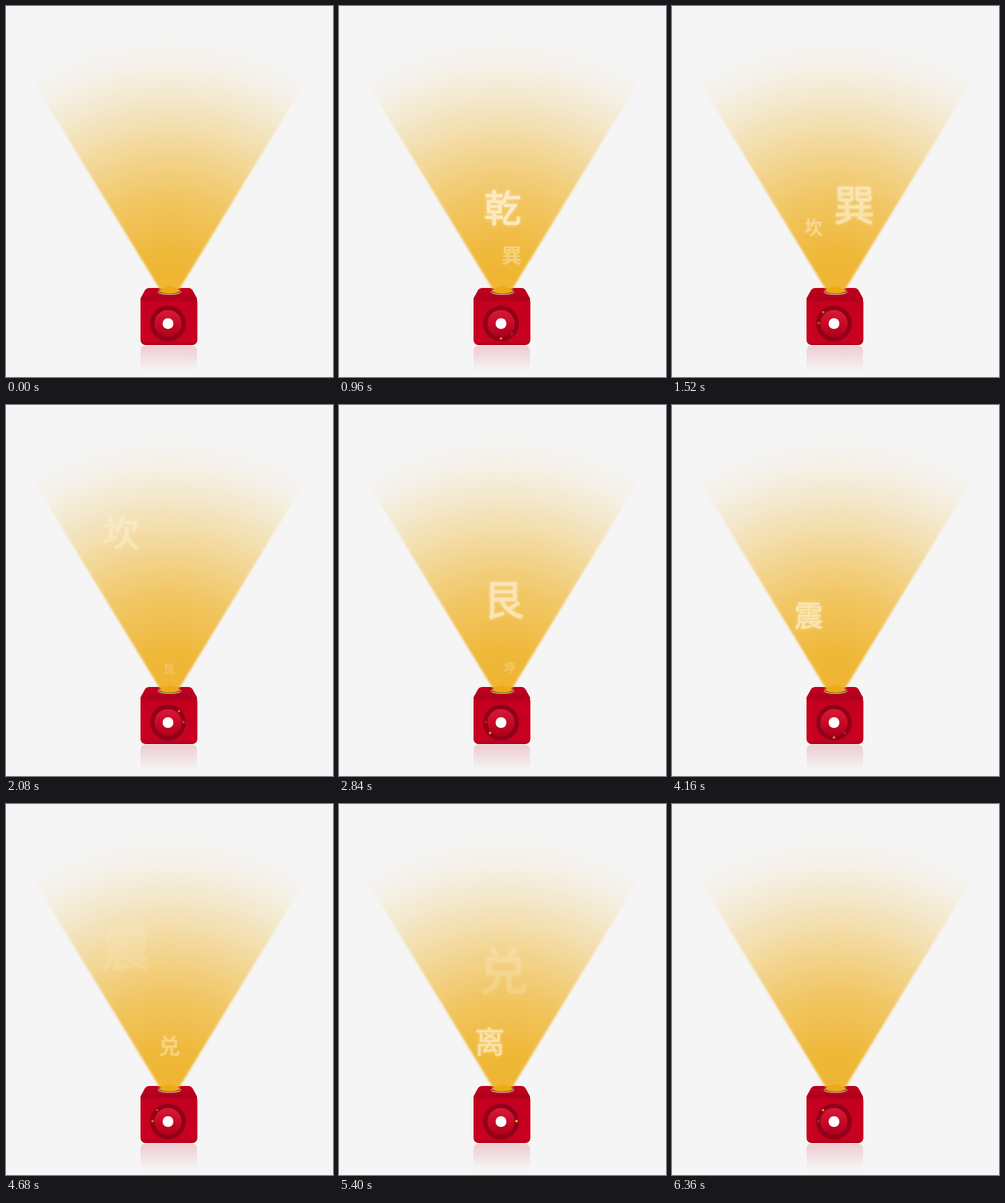
Recreate the animation shown at these times as an HTML page. Size 440 by 500 pixels, loop 6400 ms.

```html
<!DOCTYPE html>
<html lang="zh">
<head>
<meta charset="utf-8">
<style>
  html, body { margin: 0; width: 100%; height: 100%; overflow: hidden; background: #f5f5f5; }
  svg { display: block; width: 440px; height: 500px; }
  text {
    font: 400 100px "Noto Sans CJK SC", "Noto Sans CJK", sans-serif;
    text-anchor: middle;
    fill: #fff3d8; stroke: #fff3d8; stroke-width: 2;
    filter: drop-shadow(0 0 5px rgba(255, 246, 220, .6));
  }
</style>
</head>
<body>
<svg id="stage" viewBox="0 0 440 500">
  <defs>
    <radialGradient id="beam" gradientUnits="userSpaceOnUse" cx="220" cy="403" r="362">
      <stop offset="0" stop-color="#efb32a"/>
      <stop offset=".2" stop-color="#efb530" stop-opacity=".95"/>
      <stop offset=".42" stop-color="#f0b632" stop-opacity=".73"/>
      <stop offset=".61" stop-color="#f0b835" stop-opacity=".46"/>
      <stop offset=".77" stop-color="#f0ba3c" stop-opacity=".23"/>
      <stop offset=".9" stop-color="#f0bc44" stop-opacity=".07"/>
      <stop offset="1" stop-color="#f0bc44" stop-opacity="0"/>
    </radialGradient>
    <linearGradient id="lid" x2="0" y2="1">
      <stop offset="0" stop-color="#c0021f"/>
      <stop offset=".65" stop-color="#b5001c"/>
      <stop offset="1" stop-color="#a2001a"/>
    </linearGradient>
    <linearGradient id="front" x2="0" y2="1">
      <stop offset="0" stop-color="#a9001b"/>
      <stop offset=".12" stop-color="#c5001f"/>
      <stop offset=".9" stop-color="#ca0020"/>
      <stop offset="1" stop-color="#b0001b"/>
    </linearGradient>
    <linearGradient id="knob" x2="0" y2="1">
      <stop offset="0" stop-color="#d51a38"/>
      <stop offset=".5" stop-color="#c80a27"/>
      <stop offset="1" stop-color="#a9001b"/>
    </linearGradient>
    <linearGradient id="mirror" x2="0" y2="1">
      <stop offset="0" stop-color="#d0233f" stop-opacity=".2"/>
      <stop offset="1" stop-color="#d0233f" stop-opacity="0"/>
    </linearGradient>
    <filter id="soft" x="-5%" y="-5%" width="110%" height="110%"><feGaussianBlur stdDeviation="1.6"/></filter>
  </defs>

  <path d="M181 492V465Q181 458 188 458H250Q257 458 257 465V492Z" fill="url(#mirror)"/>

  <path d="M193 380H246Q249 380 251 383L257 394V402H181V394L187 383Q189 380 193 380Z" fill="url(#lid)"/>
  <rect x="181" y="392" width="76.5" height="65" rx="7" fill="url(#front)"/>
  <path d="M186 396H253" stroke="#8c0016" stroke-width="1" stroke-dasharray="1 1" opacity=".6"/>
  <circle cx="218" cy="428" r="24.5" fill="#920017" stroke="#b40a25" stroke-width="1"/>
  <circle cx="218" cy="428" r="18.3" fill="url(#knob)"/>
  <circle cx="218" cy="428" r="7.3" fill="#fff"/>
  <g id="lamps"></g>

  <ellipse cx="220" cy="385.5" rx="15.5" ry="3.2" fill="#6b3a10" stroke="#d8cfc4" stroke-width="1"/>
  <path d="M209.5 386L38 104Q128 40 220 40T402 104L230.5 386Z" fill="url(#beam)" filter="url(#soft)"/>
  <path d="M207 385Q211 378 220 378T233 385Q227 387.5 220 387.5T207 385Z" fill="#eeaa14"/>
  <g id="glyphs"></g>
</svg>

<script>
const LOOP = 6400, TICK = 40, LAP = 1600, STEP = 200, START_Y = 375;

// glyph, start ms, life ms, final size, start x, end x, end y
const flights = [
  ['乾', 0, 1400, 73, 220, 220, 205],
  ['巽', 460, 1400, 73, 225, 254, 220],
  ['坎', 1000, 1300, 59, 212, 139, 115],
  ['艮', 1795, 1400, 73, 219, 223, 209],
  ['坤', 2545, 1400, 73, 226, 252, 206],
  ['震', 3380, 1400, 69, 207, 157, 175],
  ['兑', 4130, 1400, 73, 219, 222, 204],
  ['离', 4635, 1400, 73, 211, 193, 252]
];

function add(parent, name, attrs) {
  const el = document.createElementNS('http://www.w3.org/2000/svg', name);
  for (const key in attrs) el.setAttribute(key, attrs[key]);
  return document.getElementById(parent).appendChild(el);
}

const glyphs = flights.map(([char]) => {
  const el = add('glyphs', 'text', { y: 38 });
  el.textContent = char;
  return el;
});

const lamps = Array.from({ length: 8 }, (_, i) => {
  const angle = i * Math.PI / 4;
  return add('lamps', 'circle', {
    cx: 218 + 20.8 * Math.sin(angle),
    cy: 427.3 - 20.8 * Math.cos(angle),
    r: 1.7, fill: '#ffc21c'
  });
});

const mix = (a, b, k) => a + (b - a) * k;

function drawGlyph(el, [, start, life, size, x0, x1, y1], time) {
  const p = (time - start) / life;
  const visible = p > 0 && p < 1;
  el.style.display = visible ? '' : 'none';
  if (!visible) return;
  const k = p ** 1.33;
  const x = mix(x0, x1, k), y = mix(START_Y, y1, k);
  el.setAttribute('transform', `translate(${x} ${y}) scale(${size * p / 100})`);
  el.setAttribute('opacity', 0.82 * Math.min(1, p / 0.65, (1 - p) / 0.3));
}

function drawLamp(el, i, time) {
  const peak = STEP * (i + 1);
  let gap = Math.abs(time % LAP - peak);
  // the last lamp fades across the lap boundary, except on the first lap
  if (time >= LAP) gap = Math.min(gap, LAP - gap);
  el.setAttribute('opacity', Math.max(0, 1 - gap / STEP));
}

function draw(time) {
  glyphs.forEach((el, i) => drawGlyph(el, flights[i], time));
  lamps.forEach((el, i) => drawLamp(el, i, time));
}

const begin = performance.now();
function frame() {
  const elapsed = (performance.now() - begin) % LOOP;
  draw(Math.floor(elapsed / TICK) * TICK);
  requestAnimationFrame(frame);
}
draw(0);
requestAnimationFrame(frame);
</script>
</body>
</html>
```
